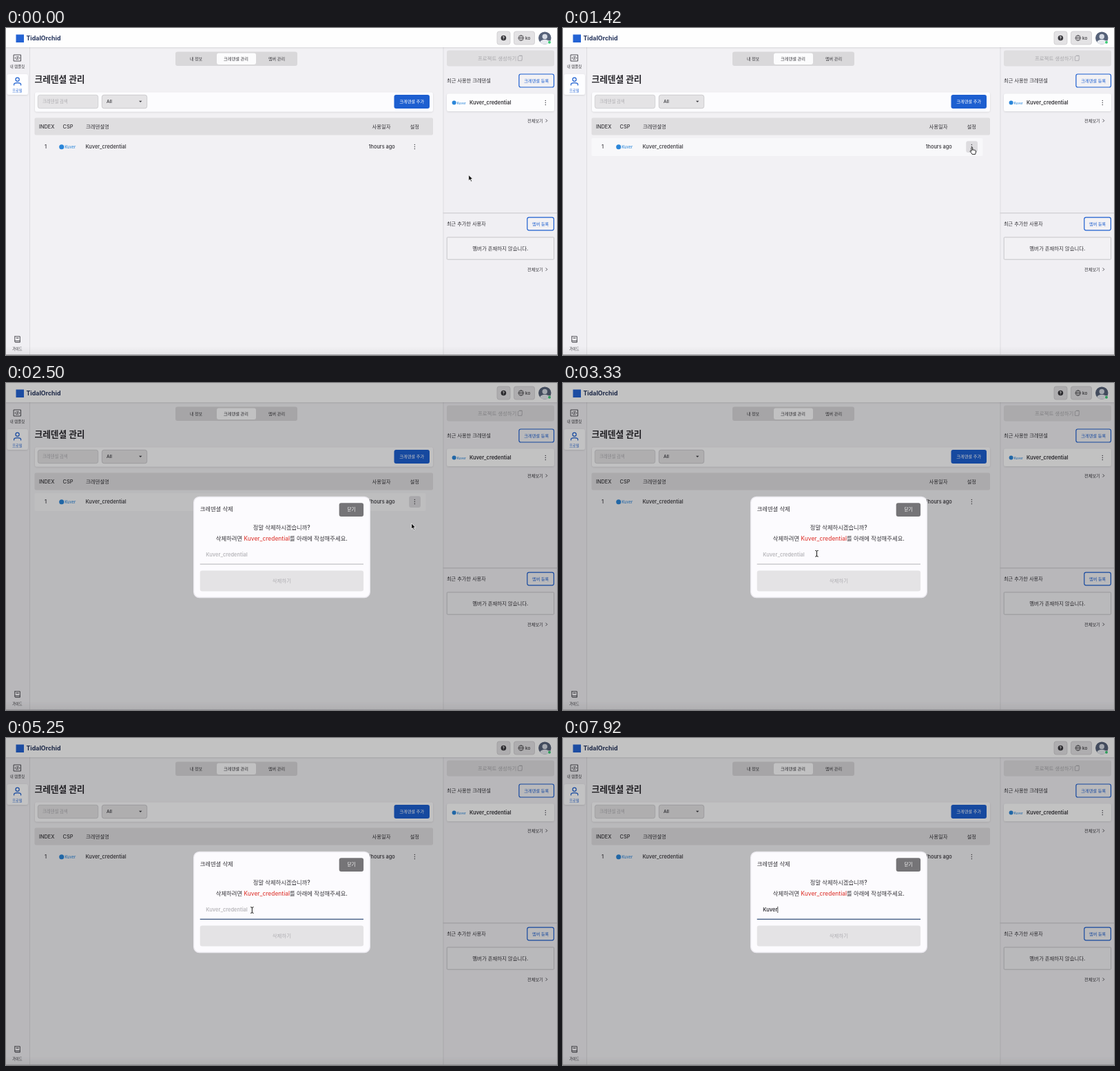
Write an HTML page that moves like this. It is 800 px wide and 475 px high and loops after 8 s.

```html
<!DOCTYPE html>
<html lang="ko">
<head>
<meta charset="utf-8">
<title>크레덴셜 관리</title>
<style>
html, body { margin: 0; width: 100%; height: 100%; overflow: hidden; background: #f2f1f4; }
svg { display: block; width: 800px; height: 475px; }
text { font-family: Inter, "Noto Sans CJK KR", "Noto Sans CJK", sans-serif; white-space: pre; }
</style>
</head>
<body>
<svg id="stage" viewBox="0 0 800 475" xmlns="http://www.w3.org/2000/svg"></svg>
<script>
const LOOP = 8000;
const BRAND = 'TidalOrchid';
const VENDOR = 'Kuver';
const CRED = VENDOR + '_credential';
const BLUE = '#1d5fd0';
const INK = '#36353a';
const PAGE = '#f2f1f4';
const stage = document.getElementById('stage');

function add(parent, tag, attrs, content) {
  const node = document.createElementNS('http://www.w3.org/2000/svg', tag);
  for (const key in attrs) node.setAttribute(key, attrs[key]);
  if (content) node.textContent = content;
  return parent.appendChild(node);
}
const group = (parent = stage) => add(parent, 'g', {});
const box = (g, x, y, w, h, fill, r = 0, more = {}) =>
  add(g, 'rect', { x, y, width: w, height: h, rx: r, fill, ...more });
const dot = (g, cx, cy, r, fill) => add(g, 'circle', { cx, cy, r, fill });
const line = (g, d, stroke, width = 1, more = {}) =>
  add(g, 'path', { d, stroke, 'stroke-width': width, fill: 'none', 'stroke-linecap': 'round', 'stroke-linejoin': 'round', ...more });
// y is the vertical middle of the glyphs
function label(g, x, y, str, size, fill = INK, weight = 500, anchor = 'start') {
  return add(g, 'text', { x, y: y + size * 0.37, 'font-size': size, fill, 'font-weight': weight, 'text-anchor': anchor }, str);
}
const centered = (g, x, y, str, size, fill, weight) => label(g, x, y, str, size, fill, weight, 'middle');
function kebab(g, x, y, fill = '#4a494e') {
  for (const d of [-3, 0, 3]) dot(g, x, y + d, 0.75, fill);
}
function vendorLogo(g, x, y, size) {
  dot(g, x + size * 0.65, y, size * 0.62, '#2b86d9');
  label(g, x + size * 1.45, y + 0.3, VENDOR, size, '#3a8fdc', 500);
}
const outline = (g, x, y, w, h, r, stroke, width, fill = PAGE) =>
  box(g, x, y, w, h, fill, r, { stroke, 'stroke-width': width });

const defs = add(stage, 'defs', {});
const blur = add(defs, 'filter', { id: 'shade', x: '-10%', y: '-30%', width: '120%', height: '170%' });
add(blur, 'feDropShadow', { dx: 0, dy: 0.8, stdDeviation: 1.2, 'flood-opacity': 0.13 });
const SHADE = { filter: 'url(#shade)' };
const fade = add(defs, 'linearGradient', { id: 'fade', x2: 0, y2: 1 });
add(fade, 'stop', { offset: 0, 'stop-opacity': 0 });
add(fade, 'stop', { offset: 1, 'stop-opacity': 0.05 });

function drawHeader(g) {
  box(g, -4, -4, 808, 32, '#fefefe', 0, SHADE);
  box(g, 14.5, 9.5, 11.5, 11.5, '#2463d4');
  label(g, 29.5, 15, BRAND, 8.8, '#25345c', 700);
  for (const [x, w] of [[713, 19], [737.5, 30]])
    outline(g, x, 5, w, 19, 3, '#c9c8cb', 0.7, '#e3e2e4');
  dot(g, 722.4, 14.5, 3.8, '#38373c');
  centered(g, 722.4, 14.6, '?', 5.6, '#fff', 700);
  line(g, 'M744 14.5a3.8 3.8 0 1 0 7.6 0a3.8 3.8 0 1 0 -7.6 0h7.6M747.8 10.7c-2.4 2-2.4 5.6 0 7.6c2.4-2 2.4-5.6 0-7.6', '#38373c', 0.7);
  label(g, 754, 14.4, 'ko', 6.3);
  dot(g, 782.3, 14.6, 9.2, '#566279');
  dot(g, 782.3, 12.4, 3.7, '#d5dae3');
  add(g, 'path', { d: 'M775.3 20.6c1.6-5 12.4-5 14 0a9.2 9.2 0 0 1-14 0z', fill: '#e6e9ef' });
  dot(g, 789, 20.8, 2.6, '#fff');
  dot(g, 789, 20.8, 2, '#3ecb78');
}

function drawSidebar(g) {
  box(g, 0, 28, 34, 447, '#f0eff3');
  line(g, 'M34.5 28V475', '#dedde1', 1);
  line(g, 'M11.5 39h10v9h-10zM15 41.8l-1.8 1.8l1.8 1.8M18 41.8l1.8 1.8l-1.8 1.8M17 41.3l-1 4.6', '#3d3c42', 0.9);
  centered(g, 16.5, 56.5, '내 템플릿', 5.4);
  box(g, 1.5, 67, 30.5, 30, '#fdfdff', 3, SHADE);
  line(g, 'M14 74.8a2.6 2.6 0 1 0 5.2 0a2.6 2.6 0 1 0 -5.2 0M11.6 83v-1.2c0-3 10-3 10 0v1.2', BLUE, 1.2);
  centered(g, 16.5, 90.6, '프로필', 5.2, BLUE);
  line(g, 'M13 448h7.3v8.6h-6.6a1 1 0 0 1-.9-1V448M13 454.6h7.3M15.2 450.4h2.8', '#3d3c42', 0.9);
  centered(g, 16.5, 466, '가이드', 5.2);
}

function drawMain(g) {
  box(g, 246, 34.5, 177, 20.5, '#d9d8da', 3);
  box(g, 306, 36.5, 57, 16.5, '#fcfcfd', 3);
  centered(g, 276, 44.3, '내 정보', 6);
  centered(g, 334, 44.3, '크레덴셜 관리', 6.2);
  centered(g, 393, 44.3, '멤버 관리', 6.1);
  label(g, 41.5, 74, '크레덴셜 관리', 12.7, '#2a292e', 700);

  box(g, 42, 93.5, 578, 28, '#fcfcfe', 3, SHADE);
  outline(g, 46.3, 97.3, 87.4, 19.4, 3, '#c8c7ca', 0.7, '#e4e3e5');
  label(g, 53, 107, '크레덴셜 검색', 6.3, '#aeadb1', 400);
  outline(g, 139.3, 97.3, 65.4, 19.4, 3, '#bfbec1', 0.7, '#e4e3e5');
  label(g, 146, 106.8, 'All', 6.6);
  add(g, 'path', { d: 'M193 105.8h4.4l-2.2 2.3z', fill: '#3d3c42' });
  box(g, 563.5, 97, 51.5, 20, BLUE, 3);
  centered(g, 589.2, 107, '크레덴셜 추가', 6.2, '#fff');

  box(g, 41.5, 130.5, 578.5, 25, '#dfdee0', 2);
  const heads = [[48, 'INDEX'], [82.5, 'CSP'], [116, '크레덴셜명'], [531.5, '사용일자'], [586.5, '설정']];
  for (const [x, str] of heads) label(g, x, 142.8, str, 7.35);

  const row = box(g, 41.5, 160, 568, 26, '#f8f8fa', 2);
  const more = box(g, 585.2, 164.2, 16.8, 16.8, '#dddcdf', 3);
  centered(g, 57.5, 172.3, '1', 7.4);
  vendorLogo(g, 77, 172.8, 5.7);
  label(g, 115.5, 172.3, CRED, 7.4);
  label(g, 526.5, 172.3, '1hours ago', 7.35);
  kebab(g, 593.4, 172.6);
  return { row, more };
}

function viewAll(g, y) {
  label(g, 757, y, '전체보기', 6.2);
  line(g, `M784 ${y - 1.8}l1.8 1.8l-1.8 1.8`, '#3d3c42', 0.9);
}

function drawPanel(g) {
  box(g, 635, 28, 165, 447, '#f0eff3');
  line(g, 'M635 28V475', '#dddce0', 1);
  line(g, 'M635 268.8H800', '#d5d4d8', 1.6);
  box(g, 640, 32.5, 156, 23, '#dfdee0', 3);
  label(g, 685, 43.8, '프로젝트 생성하기', 7.4, '#a9a8ac');
  line(g, 'M745.5 40.4h3.2M743.4 41.8v5.6h5.6v-2M743.4 41.8l2.1-1.6h3.8v5.2', '#a9a8ac', 0.8);
  label(g, 640, 76, '최근 사용한 크레덴셜', 7.25);
  outline(g, 744.9, 67, 50.6, 19, 2.5, BLUE, 1.2);
  centered(g, 770.2, 76.3, '크레덴셜 등록', 6.2, BLUE);
  box(g, 640, 95.5, 156, 25.5, '#fdfdfe', 3, SHADE);
  vendorLogo(g, 647.5, 108.6, 4.8);
  label(g, 673, 108.3, CRED, 7.45, INK, 600);
  kebab(g, 783.3, 108.4);
  viewAll(g, 134.6);
  label(g, 640, 284, '최근 추가한 사용자', 7.2);
  outline(g, 756.8, 275.2, 38.6, 18.6, 2.5, BLUE, 1.2);
  centered(g, 776.1, 284.3, '멤버 등록', 6.1, BLUE);
  outline(g, 640.2, 304, 155.4, 32.2, 1, '#c6c5c9', 1);
  centered(g, 717.8, 319.9, '멤버가 존재하지 않습니다.', 7.4);
  viewAll(g, 350.6);
}

function drawMenu(g) {
  outline(g, 547.6, 183.2, 54.4, 31.6, 2.5, '#c9c8cc', 0.8, '#f7f7f9');
  const hover = box(g, 549.5, 199, 50.6, 13.8, '#e1e0e3', 2);
  centered(g, 574.6, 190.9, '정보보기', 6.2, '#55545a');
  centered(g, 574.6, 206, '삭제하기', 6.2, '#55545a');
  return hover;
}

function drawModal(g) {
  box(g, 0, 0, 800, 475, '#000', 0, { opacity: 0.235 });
  outline(g, 272.7, 165.5, 255.6, 146, 8, '#eceaf0', 1.4, '#fcfbfe');
  label(g, 281.7, 183.3, '크레덴셜 삭제', 8.3);
  box(g, 483.7, 174.3, 35.4, 19.8, '#757477', 3);
  centered(g, 501.4, 184, '닫기', 6.5, '#fff');
  centered(g, 400.3, 210.3, '정말 삭제하시겠습니까?', 8.3);
  const ask = centered(g, 400.3, 226.1, '삭제하려면 ', 8.35);
  add(ask, 'tspan', { fill: '#e0443e' }, CRED);
  add(ask, 'tspan', {}, '를 아래에 작성해주세요.');
  const hint = label(g, 290.3, 249.4, CRED, 7.45, '#b9b8bc', 600);
  const typed = label(g, 290.3, 249.4, '', 7.45, INK, 600);
  const caret = box(g, 290.3, 244.8, 0.8, 9.2, '#222');
  const rule = box(g, 281.7, 262.6, 237.3, 1, '#b4b3b7');
  box(g, 281.7, 272.5, 237.4, 30, '#e4e3e5', 3);
  centered(g, 400.4, 287.5, '삭제하기', 7.4, '#b0afb3');
  return { hint, typed, caret, rule };
}

function drawCursors(g) {
  const edge = { stroke: '#fff', 'stroke-width': 0.8, 'stroke-linejoin': 'round' };
  const arrow = add(g, 'path', { d: 'M0 0V8.4L2 6.7L3.4 9.8L4.9 9.1L3.5 6.1H6.1Z', fill: '#111', ...edge });
  const hand = add(g, 'path', {
    d: 'M-.8 .8c0-1.2 1.7-1.2 1.7 0V4c.2-.9 1.6-.8 1.7.1c.4-.6 1.5-.4 1.6.4c.6-.4 1.5 0 1.5.9c0 2-.4 3-.9 4.6H.3c-.7-1.4-1.8-2.6-2.8-3.8c-.6-.9.3-1.6 1-1.1l.7.7z',
    fill: '#fff', stroke: '#111', 'stroke-width': 0.9, 'stroke-linejoin': 'round'
  });
  const beam = group(g);
  const shape = 'M-1.8-4.4Q0-4.4 0-3.2Q0-4.4 1.8-4.4M0-3.2V3.2M-1.8 4.4Q0 4.4 0 3.2Q0 4.4 1.8 4.4';
  line(beam, shape, '#fff', 2);
  line(beam, shape, '#111', 1);
  return { arrow, hand, beam };
}

const page = group();
const { row, more } = drawMain(page);
drawPanel(page);
drawSidebar(page);
drawHeader(page);
box(page, 0, 462, 800, 13, 'url(#fade)');
const menu = group();
const menuHover = drawMenu(menu);
const modal = group();
const field = drawModal(modal);
box(stage, 0, 474.3, 800, 0.7, '#8b8a8e');
const pointer = group();
const cursors = drawCursors(pointer);

const MENU_AT = 1580, MODAL_AT = 2500, LEAVE_AT = 2830, FOCUS_AT = 3560;
// time, x, y of the pointer tip
const path = [[0, 671.7, 213.4], [250, 671.7, 213.4], [1080, 593.8, 173.4], [1670, 593.8, 173.4],
  [2170, 588.6, 203.8], [2750, 588.6, 203.8], [3420, 357.3, 250], [LOOP, 357.3, 250]];
const keys = [5920, 6250, 6750, 7080, 7500];

function tipAt(t) {
  const i = path.findIndex((p, n) => n && t <= p[0]);
  const [t0, x0, y0] = path[i - 1], [t1, x1, y1] = path[i];
  const u = (t - t0) / (t1 - t0);
  const k = u * u * (3 - 2 * u);
  return [x0 + (x1 - x0) * k, y0 + (y1 - y0) * k];
}
const within = (x, y, l, t, r, b) => x >= l && x <= r && y >= t && y <= b;
const show = (node, on) => node.setAttribute('visibility', on ? 'inherit' : 'hidden');

function render(t) {
  const [x, y] = tipAt(t);
  const menuOpen = t >= MENU_AT && t < MODAL_AT;
  const modalOpen = t >= MODAL_AT;
  const held = t >= MENU_AT && t < LEAVE_AT;
  const onMore = !modalOpen && within(x, y, 585, 164, 602, 181);
  const onItem = menuOpen && within(x, y, 548, 183, 602, 215);
  show(row, held || (!modalOpen && within(x, y, 41, 160, 609, 186)));
  show(more, held || onMore);
  show(menu, menuOpen);
  show(menuHover, menuOpen && y > 198);
  show(modal, modalOpen);

  const onField = modalOpen && within(x, y, 282, 238, 519, 263);
  const kind = onField ? 'beam' : onMore || onItem ? 'hand' : 'arrow';
  for (const name in cursors) show(cursors[name], name === kind);
  pointer.setAttribute('transform', `translate(${x.toFixed(2)} ${y.toFixed(2)})`);
  show(pointer, t < keys[0]);

  const count = keys.filter(k => t >= k).length;
  const focused = t >= FOCUS_AT;
  field.typed.textContent = VENDOR.slice(0, count);
  show(field.hint, modalOpen && !count);
  const since = t - (count ? keys[count - 1] : FOCUS_AT);
  const width = count ? field.typed.getComputedTextLength() : 0;
  field.caret.setAttribute('x', 290.3 + width);
  show(field.caret, modalOpen && focused && since % 1000 < 500);
  field.rule.setAttribute('fill', focused ? '#3a567f' : '#b4b3b7');
  field.rule.setAttribute('height', focused ? 1.3 : 1);
}

const start = performance.now();
function tick() {
  render((performance.now() - start) % LOOP);
  requestAnimationFrame(tick);
}
tick();
</script>
</body>
</html>
```
